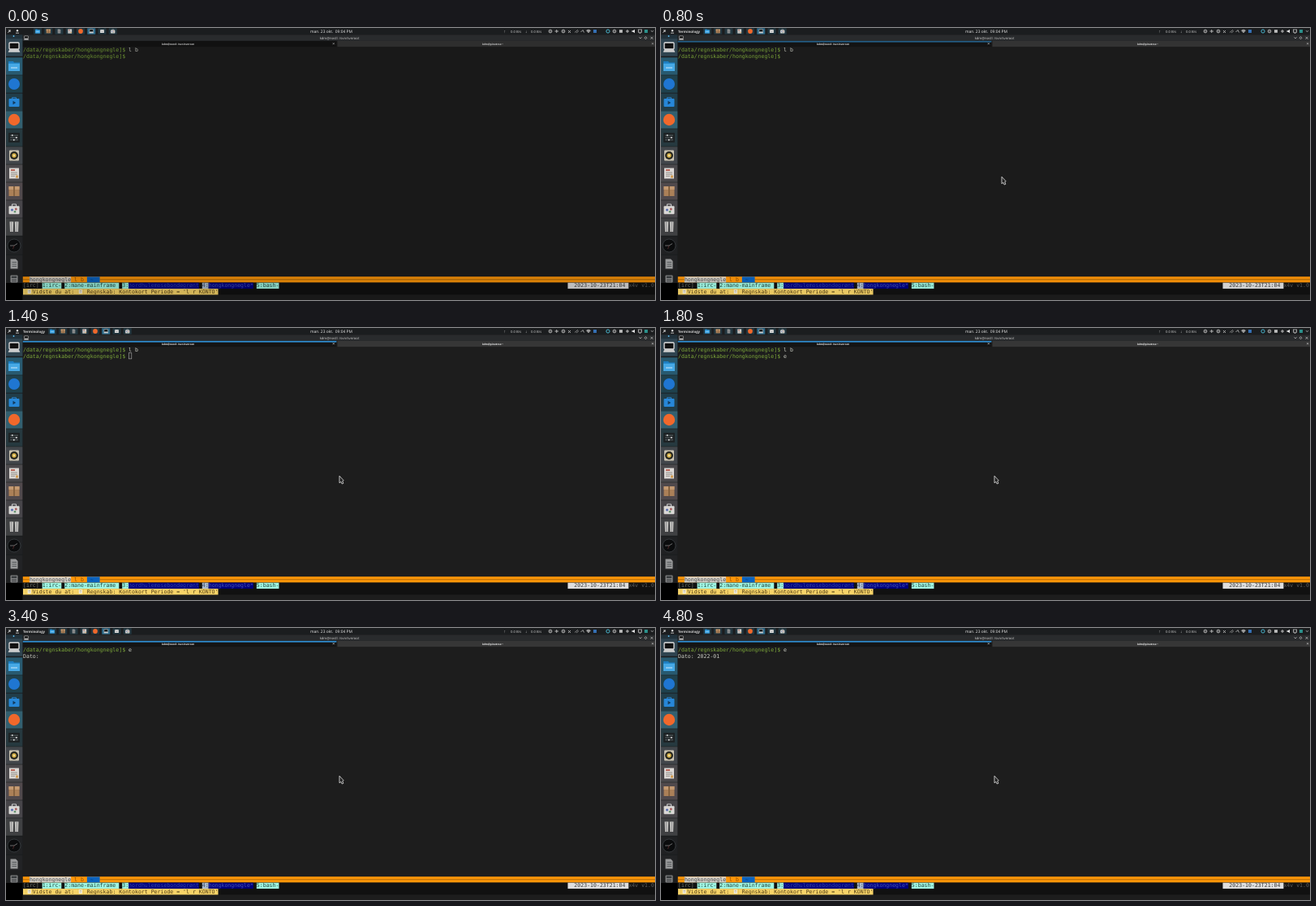
Write an HTML page that moves like this. It is 800x335 px and loops after 5 s.

```html
<!DOCTYPE html>
<html lang="da">
<head>
<meta charset="utf-8">
<title>Terminal</title>
<style>
html, body { margin: 0; width: 100%; height: 100%; overflow: hidden; background: #1d1d1d; }
svg { display: block; width: 800px; height: 335px; }
text { white-space: pre; text-rendering: geometricPrecision; }
.mono { font-family: "DejaVu Sans Mono", monospace; font-size: 6.55px; }
.ui { font-family: "Open Sans", "Noto Sans", sans-serif; font-size: 4.9px; fill: #d0d0d0; }
.tab { font-size: 3.2px; font-weight: 700; fill: #eee; }
</style>
</head>
<body>
<svg id="stage" viewBox="0 0 800 335"></svg>
<script>
const CELL = 3.943, LEFT = 21, STEP = 200, LOOP = 5000;
const PROMPT = "/data/regnskaber/hongkongnegle]$ ";
const ROWS = { 1: 29.2, 2: 36.5, bar: 312, tabs: 319.4, tip: 326.8 };

const col = n => LEFT + n * CELL;
const rect = (x, y, w, h, fill, more = "") =>
  `<rect x="${x}" y="${y}" width="${w}" height="${h}" fill="${fill}" ${more}/>`;
const circle = (x, y, r, fill, more = "") =>
  `<circle cx="${x}" cy="${y}" r="${r}" fill="${fill}" ${more}/>`;
const path = (d, stroke, width = 1, fill = "none") =>
  `<path d="${d}" stroke="${stroke}" stroke-width="${width}" fill="${fill}"/>`;
const label = (x, y, s, cls = "ui", more = "") =>
  `<text x="${x}" y="${y}" class="${cls}" ${more}>${s}</text>`;
const mono = (n, row, s, fill) =>
  label(col(n), ROWS[row], s, "mono", `fill="${fill}"`);
const cells = (n, count, row, fill) =>
  rect(col(n), ROWS[row] - 5.7, count * CELL, 7.4, fill);
const chip = (n, row, s, bg, fg) => cells(n, s.length, row, bg) + mono(n, row, s, fg);
const place = (x, y, size, body) =>
  `<g transform="translate(${x} ${y}) scale(${size})">${body}</g>`;

// Icons are drawn around their own centre.
const icons = {
  term: rect(-6, -6, 12, 8, "#111", 'stroke="#e0e0e0" stroke-width="1.3" rx="1"') +
    path("M-7 5.5H7L5.5 2.6H-5.5Z", "#ddd", .5, "#ccc"),
  folder: path("M-7-6H-1L0-4.5H7V6H-7Z", "none", 0, "#1d7fc2") +
    rect(-7, -3.2, 14, 9.2, "#46a9e6") + rect(-4, 1.5, 8, 1, "#cbe8fa"),
  mail: circle(0, 0, 7, "#1f76d2"),
  bag: path("M-2.5-4V-5.5H2.5V-4", "#2787d8", 1) + rect(-6.5, -4.3, 13, 10, "#2787d8", 'rx="1"') +
    path("M-1.5-1.5L2.2.7L-1.5 2.9Z", "none", 0, "#123a5c"),
  web: circle(0, 0, 7.2, "#f0682b"),
  sliders: rect(-7, -6, 14, 12, "#1d2224", 'rx="1"') +
    path("M-5-2.8H5M-5 0H5M-5 2.8H5", "#6d7578", .8) +
    rect(-3, -3.7, 1.5, 1.8, "#ddd") + rect(2, -.9, 1.5, 1.8, "#ddd") + rect(-1, 1.9, 1.5, 1.8, "#ddd"),
  disc: rect(-6, -6.5, 12, 13, "#c9c2b0", 'rx="1"') + circle(0, 0, 5, "#26261f") +
    circle(0, 0, 2.7, "#d8b245") + circle(0, 0, 1.1, "#f2e6b8"),
  doc: rect(-6, -6.5, 12, 13, "#dcd8d4") + rect(-4, -5, 5, 2, "#b8665a") +
    path("M-4-1H4M-4 1.2H4M-4 3.4H1", "#85807c", .8) + rect(2, 2.5, 3, 3, "#cf9a50"),
  box: rect(-6.5, -6, 13, 12, "#ab8058") + rect(-6.5, -6, 13, 4, "#c49a72") +
    rect(-1, -6, 2, 12, "#86623f"),
  paint: path("M-2.5-3V-6H2.5V-3", "#ccc", 1) + rect(-6.5, -3.8, 13, 10, "#dad8d6", 'rx="1"') +
    circle(-2.5, 1, 1.6, "#5c6fb0") + circle(2.3, 0, 1.5, "#a6605f") + circle(1, 3.3, 1.3, "#5f8f6b"),
  pillars: path("M-5.5-6.5H-.8L-1.3 6H-5Z M.8-6.5H5.5L5 6H1.3Z", "none", 0, "#c4c3c0") +
    rect(-3.7, -6, .9, 12, "#88878a") + rect(2.8, -6, .9, 12, "#88878a"),
  clock: circle(0, 0, 8, "#0b0c0d", 'stroke="#3c4144" stroke-width=".8"') +
    path("M-5 0H0L4-2.5", "#aaa", .6) + path("M0 0L-1.5 4", "#844", .5),
  notes: path("M-4.5-6H2L4.5-3.5V6H-4.5Z", "none", 0, "#98999a") +
    path("M-2.5-2H3M-2.5 .5H3M-2.5 3H3", "#505355", .9),
  calc: rect(-4.5, -4.5, 9, 9, "#828384", 'rx="1"') + rect(-3.2, -3.4, 6.4, 2.4, "#35393b") +
    path("M-3 .8H3M-3 2.8H3", "#3c3f41", 1),
  letter: rect(-6, -5, 12, 10, "#dcdcdc") + path("M-6-4L0 1L6-4", "#777", 1.2)
};

const dockTiles = [
  ["term", 24, "#2f4450"], ["folder", 47, "#285a70"], ["mail", 69, "#1f414d"],
  ["bag", 91.3, "#213d49"], ["web", 113, "#336070"], ["sliders", 135, "#26393f"],
  ["disc", 157, "#42464b"], ["doc", 179, "#4b494c"], ["box", 201, "#50494c"],
  ["paint", 223, "#474549"], ["pillars", 245, "#3f4042"], ["clock", 268, "#202123"],
  ["notes", 290.5, "#222325"], ["calc", 309, "#1d1e1f"]
];

function dock() {
  let out = rect(0, 8, 20.4, 327, "#1a1d1f") + rect(0, 8, 20.4, 6, "#22323b") +
    circle(9.5, 10, .9, "#5fc0f5");
  for (const [name, y, bg] of dockTiles)
    out += rect(0, y - 10.7, 20.4, 21.4, bg) + place(10, y, 1, icons[name]);
  return out + rect(0, 314, 20.4, 21, "#000");
}

function tasks() {
  const names = ["folder", "box", "notes", "doc", "web", "term", "letter", "paint"];
  return names.map((name, i) => {
    const x = 39 + i * 13.25;
    return rect(x - 5, .3, 10, 7.4, name === "term" ? "#2b6a8a" : "#22363f") +
      place(x, 4, .4, icons[name]);
  }).join("");
}

function tray() {
  const grey = "#bdbdbd", small = 'style="font-size:4.2px"';
  let out = label(613.5, 5.8, "↑") + label(622, 5.6, "0.0 B/s", "ui", small) +
    label(640, 5.8, "↓") + label(647, 5.6, "0.0 B/s", "ui", small);
  for (const x of [671, 687, 750])
    out += circle(x, 4, 1.9, "none", `stroke="${grey}" stroke-width=".9"`) + circle(x, 4, .7, grey);
  return out + path("M676.5 4H681M678.7 2V6M693 3L696 6M696 3L693 6", grey, .9) +
    path("M701 5.5L705 2.2M703 6L706 3.5", "#9b9b9b", .8) +
    path("M708.5 5L711 2.5L712.5 5.5", grey, .8) +
    path("M715.5 3Q718 1 720.5 3L718 6Z", grey, .5, "#999") +
    rect(724, 2, 4, 4, "#346fb4") +
    circle(742, 4, 2.1, "none", 'stroke="#49b6cf" stroke-width="1"') +
    rect(756, 2.2, 4, 3.6, grey) + path("M764 4H768M766 2V6", grey, 1) +
    path("M771.5 3.2H773L775 1.7V6.3L773 4.8H771.5Z", "none", 0, "#eee") +
    rect(779.4, 2, 4.2, 3.2, "none", `stroke="${grey}" stroke-width=".8"`) + rect(780.5, 6, 2, .7, grey) +
    rect(787, 2, 4, 4, "#2b8f8a") + path("M795 3L796.5 4.8L798 3", grey, .7);
}

function topBar() {
  return rect(0, 0, 800, 8.3, "#1b1d1f") +
    path("M2.5 5.7L5.5 2.5M3 3H5V5", "#ddd", .9) +
    circle(14, 3.2, 1.2, "#ddd") + path("M12 6.2H16", "#ddd", .8) +
    label(21, 5.8, "Terminology", "ui", 'id="app" font-weight="700" style="font-size:4.4px"') +
    `<g id="tasks">${tasks()}</g>` +
    label(401, 5.8, "man. 23 okt.  09:04 PM", "ui", 'text-anchor="middle" style="font-size:4.9px;fill:#eee"') +
    tray();
}

function frameBars() {
  const mid = 'text-anchor="middle"';
  return rect(20.4, 8.3, 779.6, 7.6, "#292b2d") +
    place(25, 12.2, .4, icons.term) +
    label(411, 13.8, "kdm@nostl: /svn/svnroot", "ui", mid + ' style="font-size:4.2px"') +
    path("M780.5 11.3L782 13L783.5 11.3M787 12.2L788.5 10.6L790 12.2L788.5 13.8ZM794.5 10.8L797.5 13.8M797.5 10.8L794.5 13.8", "#c8c8c8", .7) +
    rect(20.4, 15.9, 387, 7.2, "#141414") + rect(408.5, 15.9, 391.5, 7.2, "#363636") +
    label(212, 20.6, "kdm@nostl: /svn/svnroot", "ui tab", mid) +
    label(600, 20.6, "kdm@pinetree:~", "ui tab", mid) +
    path("M402.8 18.3L404.8 20.3M404.8 18.3L402.8 20.3M796.2 18.3L798 20.3M798 18.3L796.2 20.3", "#ddd", .6);
}

function status() {
  const cyan = "#9ff5e2", navy = "#00007c", ink = "#20463f", yellow = "#f8d468", brown = "#4d3a12";
  const badge = n => cells(n, 2, "tip", yellow) + rect(col(n) + 1.8, 322.2, 4, 4.8, "#f4f1e6") +
    path(`M${col(n) + 2.6} 323.5h2.4m-2.4 1.6h2.4`, "#a79b75", .6);
  return rect(20.4, 306.2, 779.6, 7.4, "#ff9608") +
    path("M21 309.8H29M115.5 309.8H800", "#8a560a", .7) +
    chip(2, "bar", "hongkongnegle", "#d9d4cb", "#444") +
    mono(16, "bar", "l b", "#8a4d00") + chip(20, "bar", " ~  ", "#0b63c0", "#073b78") +
    rect(20.4, 313.6, 779.6, 14.8, "#111") +
    mono(0, "tabs", "[irc]", "#70756c") +
    chip(6, "tabs", "1:irc-", cyan, ink) +
    chip(13, "tabs", "2:mane-mainframe ", cyan, ink) +
    chip(31, "tabs", "3:", cyan, ink) +
    chip(33, "tabs", "nordhulemosebondegrønt", navy, "#3444a6") +
    chip(56, "tabs", "4:", "#a9b9cc", "#3e4a66") +
    chip(58, "tabs", "hongkongnegle*", navy, "#4656b8") +
    chip(73, "tabs", "5:bash-", cyan, ink) +
    chip(170.3, "tabs", "  2023-10-23T21:04 ", "#dedede", "#3a3a3a") +
    mono(189.3, "tabs", "x4v v1.0", "#5e5e5e") +
    cells(0, 1, "tip", yellow) + badge(1) + chip(3, "tip", "Vidste du at: ", yellow, brown) +
    badge(17) + chip(19, "tip", " Regnskab: Kontokort Periode = 'l r KONTO'", yellow, brown);
}

const line = n =>
  `<text y="${ROWS[n]}" x="${LEFT}" class="mono"><tspan fill="#7da83a" id="ps${n}"></tspan><tspan fill="#cdcfc6" id="in${n}"></tspan></text>`;

const $ = id => document.getElementById(id);
$("stage").innerHTML =
  rect(0, 0, 800, 335, "#1d1d1d") + frameBars() + line(1) + line(2) +
  rect(0, 0, 3.4, 7.2, "none", 'id="caret" stroke="#b4b4b4" stroke-width=".6"') + status() +
  rect(20.4, 15.9, 779.6, 319.1, "#000", 'id="dim"') +
  rect(20.4, 15.9, 387, 1.7, "#2f8fd4", 'id="focus"') +
  dock() + topBar() +
  `<g id="mouse">${path("M0 0V8.6L1.9 7.1L3.2 9.8L4.9 9L3.7 6.4L5.2 5.6Z", "#e6e6e6", .8, "#222")}</g>`;

const show = (id, opacity) => $(id).setAttribute("opacity", opacity);
const move = (id, x, y) => $(id).setAttribute("transform", `translate(${x} ${y})`);

// Later entries override earlier ones: [ms, changed values].
const script = [
  [0, { one: "l b", ask: true, two: "", caret: null, mouse: null, lit: 0 }],
  [600, { mouse: [436.6, 185.2] }],
  [800, { mouse: [420, 183.2], lit: .6 }],
  [1000, { mouse: [411, 182.2], lit: 1, caret: [33, 2] }],
  [1800, { two: "e", caret: null }],
  [2200, { caret: [34, 2] }],
  [2400, { one: "e", ask: false, two: "", caret: [34, 1] }],
  [2800, { two: "Dato: " }],
  [3000, { caret: [6, 2] }],
  [3200, { caret: null }]
];
const DATE = "2022-01", TYPE_AT = 3600;

function draw(ms) {
  const s = {};
  for (const [when, change] of script) if (when <= ms) Object.assign(s, change);
  if (ms >= TYPE_AT) s.two += DATE.slice(0, Math.floor((ms - TYPE_AT) / STEP) + 1);

  $("ps1").textContent = PROMPT;
  $("in1").textContent = s.one;
  $("ps2").textContent = s.ask ? PROMPT : "";
  $("in2").textContent = s.two;

  show("caret", s.caret ? 1 : 0);
  if (s.caret) move("caret", col(s.caret[0]) + .3, ROWS[s.caret[1]] - 5.8);
  show("mouse", s.mouse ? 1 : 0);
  if (s.mouse) move("mouse", ...s.mouse);

  show("dim", .15 * (1 - s.lit));
  show("focus", s.lit);
  show("app", s.lit > 0 ? 1 : 0);
  move("tasks", s.lit > 0 ? 18 : 0, 0);
}

let last = -1;
function tick() {
  const ms = Math.floor(performance.now() % LOOP / STEP) * STEP;
  if (ms !== last) draw(last = ms);
  requestAnimationFrame(tick);
}
tick();
</script>
</body>
</html>
```
